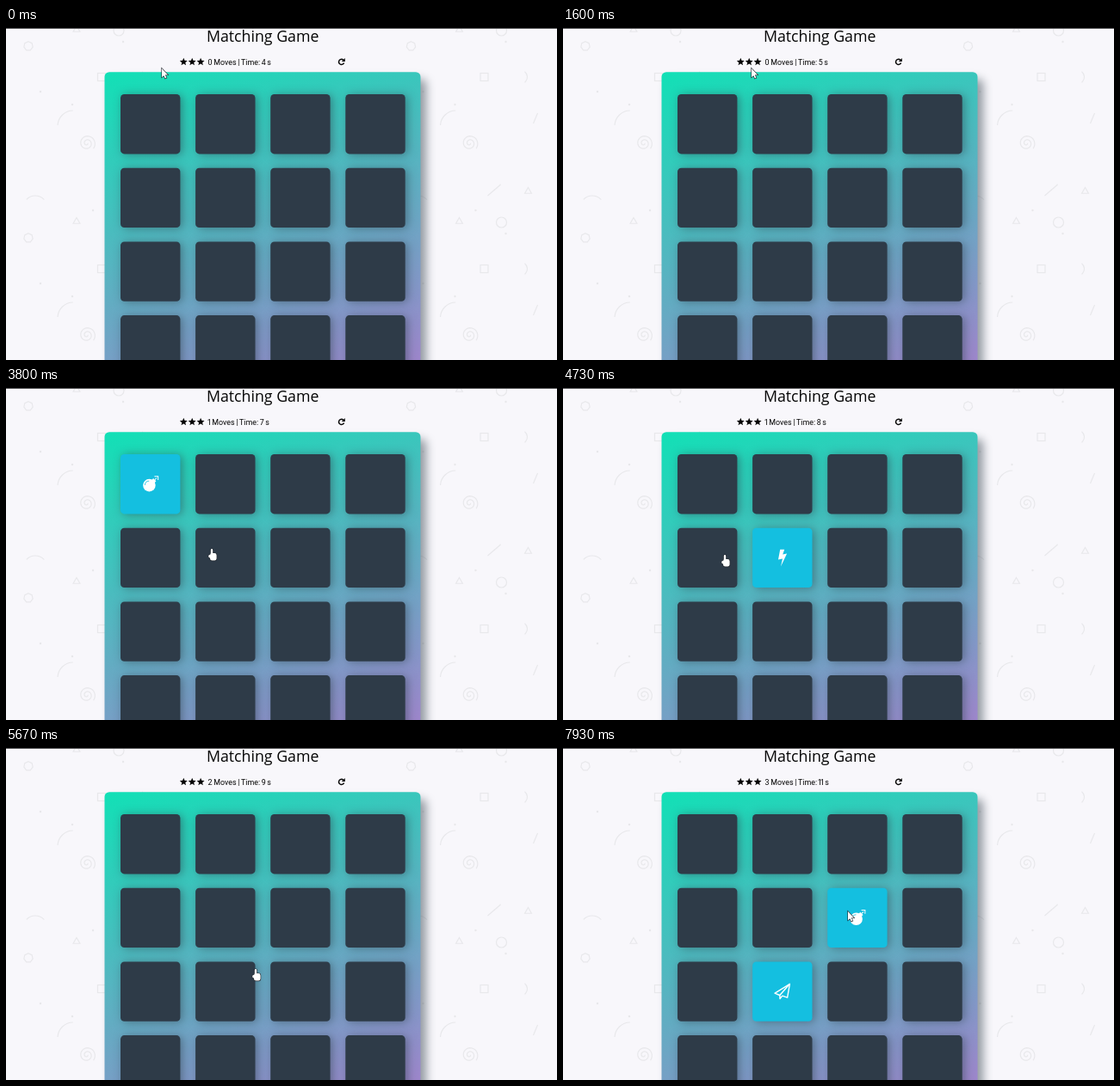
Recreate the animation shown at these times as an HTML page with a canvas. Size 640 by 386 pixels, loop 8 s.

```html
<!DOCTYPE html>
<html lang="en">
<head>
<meta charset="utf-8">
<title>Matching Game</title>
<style>
html, body { margin: 0; width: 100%; height: 100%; overflow: hidden; background: #f8f7fb; }
canvas { display: block; width: 640px; height: 386px; }
</style>
</head>
<body>
<canvas id="stage" width="640" height="386"></canvas>
<script>
const ctx = document.getElementById('stage').getContext('2d');
const LOOP = 8000;
const TILE_W = 444.5, TILE_H = 223;
const CARD = 69.4, STEP_X = 87.1, STEP_Y = 85.7;
const OPEN = '#14bfe0', CLOSED = '#2e3b48', INK = '#050505';

const turns = [
  { col: 0, row: 0, icon: bomb, from: 3200, to: 4730 },
  { col: 1, row: 1, icon: bolt, from: 4130, to: 4870 },
  { col: 1, row: 2, icon: plane, from: 5930, to: LOOP },
  { col: 2, row: 1, icon: bomb, from: 7400, to: LOOP }
];
const moveTimes = [3200, 4800, 7400];

const start = { x: 181, y: 47 };
const glides = [
  { x: 219, y: 47, from: 0, to: 1600 },
  { x: 159, y: 104, from: 1600, to: 2870 },
  { x: 239, y: 187, from: 3200, to: 3800 },
  { x: 188, y: 194, from: 4130, to: 4600 },
  { x: 290, y: 257, from: 4730, to: 5670 },
  { x: 250, y: 270, from: 5670, to: 5930 },
  { x: 331, y: 190, from: 6470, to: 7200 }
];

const cardX = col => 133 + col * STEP_X;
const cardY = row => 77 + row * STEP_Y;

function arc(x, y, r, a = 0, b = Math.PI * 2) {
  ctx.beginPath();
  ctx.arc(x, y, r, a, b);
}

function line(...points) {
  ctx.beginPath();
  points.forEach(([x, y]) => ctx.lineTo(x, y));
}

function shape(...points) {
  line(...points);
  ctx.closePath();
}

// Regular polygon, or a star when a smaller inner radius is given
function ring(x, y, r, corners, inner = r) {
  shape(...Array.from({ length: corners }, (_, i) => {
    const a = i / corners * Math.PI * 2 - Math.PI / 2;
    const d = i % 2 ? inner : r;
    return [x + d * Math.cos(a), y + d * Math.sin(a)];
  }));
}

function placed(x, y, paint) {
  ctx.save();
  ctx.translate(x, y);
  paint();
  ctx.restore();
}

function shadowBox(x, y, w, h, r, fill, dx, dy) {
  ctx.save();
  ctx.shadowColor = 'rgba(46,61,73,.5)';
  ctx.shadowOffsetX = dx;
  ctx.shadowOffsetY = dy;
  ctx.shadowBlur = 11;
  ctx.fillStyle = fill;
  ctx.beginPath();
  ctx.roundRect(x, y, w, h, r);
  ctx.fill();
  ctx.restore();
}

function spiral(x, y) {
  ctx.beginPath();
  for (let a = 0; a < 13.5; a += .25) {
    const r = .8 + a * .68;
    ctx.lineTo(x + r * Math.cos(a), y + r * Math.sin(a));
  }
  ctx.stroke();
}

function zigzag(x, y) {
  ctx.beginPath();
  for (let i = 0; i < 5; i++) {
    ctx.lineTo(x + Math.ceil(i / 2) * 7 + i % 2, y - Math.floor(i / 2) * 6 - (i % 2 ? 0 : -7));
  }
  ctx.stroke();
}

function patternTile() {
  ctx.strokeStyle = ctx.fillStyle = '#e8e8eb';
  ctx.lineWidth = 1.2;
  ring(26, 21, 5.3, 7); ctx.stroke();
  arc(131, 3, 6); ctx.stroke();
  ctx.strokeRect(106.5, 52.5, 9, 9);
  arc(78, 114, 18, 3.2, 4.7); ctx.stroke();
  arc(34, 209, 14, 3.9, 5.55); ctx.stroke();
  arc(153, 57, 8, -.9, .9); ctx.stroke();
  ring(82, 2, 4.5, 3); ctx.stroke();
  ring(162, 190, 4.5, 3); ctx.stroke();
  line([168, 111], [173, 99]); ctx.stroke();
  spiral(94, 134);
  zigzag(115, 188);
  for (const [x, y] of [[40, 74], [136, 16], [77, 89], [101, 212]]) {
    arc(x, y, 1.2);
    ctx.fill();
  }
}

function background() {
  ctx.fillStyle = '#f8f7fb';
  ctx.fillRect(0, 0, 640, 386);
  for (let x = 0; x < 640; x += TILE_W) {
    for (let y = 0; y < 386; y += TILE_H) placed(x, y, patternTile);
  }
  ctx.fillStyle = '#555557';
  ctx.fillRect(0, 0, 640, 1);
}

// Tight word gaps and a slim figure one
function narrowText(text, x, y) {
  for (const ch of text) {
    const one = ch === '1';
    ctx.fillText(ch, one ? x - .8 : x, y);
    x += one ? 3 : ch === ' ' ? 1.6 : ctx.measureText(ch).width;
  }
}

function header(t) {
  const moves = moveTimes.filter(m => t >= m).length;
  const seconds = 4 + Math.max(0, Math.floor((t - 470) / 1000));
  ctx.fillStyle = ctx.strokeStyle = INK;
  ctx.font = '17.76px "Open Sans", sans-serif';
  ctx.textAlign = 'center';
  ctx.fillText('Matching Game', 298.2, 16);
  ctx.textAlign = 'left';
  ctx.font = '8.88px Roboto, sans-serif';
  narrowText(`${moves} Moves | Time: ${seconds} s`, 234.6, 42.5);

  for (let i = 0; i < 3; i++) {
    ring(206.3 + i * 9.9, 39.5, 4.7, 10, 2.1);
    ctx.fill();
  }
  ctx.lineWidth = 1.4;
  arc(389.7, 39.4, 3.1, .35, Math.PI * 1.75);
  ctx.stroke();
  shape([393.8, 35], [393.8, 39], [389.8, 39]);
  ctx.fill();
}

function bomb() {
  ctx.translate(-1.3, 1.4);
  ctx.rotate(Math.PI / 4);
  arc(0, 0, 7.3);
  ctx.fill();
  ctx.fillRect(-2.3, -9, 4.6, 3);
  ctx.lineWidth = 1;
  line([0, -9], [0, -12]);
  ctx.stroke();
  line([-3, -11.5], [0, -14.5], [3, -11.5]);
  ctx.stroke();
  ctx.strokeStyle = OPEN;
  ctx.lineWidth = .8;
  arc(0, 0, 5, 2.4, 3.9);
  ctx.stroke();
}

function bolt() {
  shape([-2.6, -9.7], [2.4, -9.7], [.4, -4], [5.3, -5], [-1.8, 10], [.2, 1], [-4.8, 2]);
  ctx.fill();
}

function plane() {
  ctx.lineWidth = 1.4;
  ctx.lineJoin = 'round';
  shape([-8.8, 2], [8.6, -8.8], [5.8, 7], [0, 5], [-2.8, 8.4], [-3, 4.4]);
  ctx.stroke();
  line([-3, 4.4], [8.6, -8.8]);
  ctx.stroke();
}

function openCard(col, row, t) {
  return turns.find(c => c.col === col && c.row === row && t >= c.from && t < c.to);
}

function deck(t) {
  const shade = ctx.createLinearGradient(216, 15.5, 380, 465.5);
  shade.addColorStop(0, '#12e0b6');
  shade.addColorStop(1, '#aa7ecd');
  shadowBox(114.5, 51.2, 367, 377, 5.5, shade, 6.7, 8.3);

  for (let row = 0; row < 4; row++) {
    for (let col = 0; col < 4; col++) {
      const open = openCard(col, row, t);
      const x = cardX(col), y = cardY(row);
      shadowBox(x, y, CARD, CARD, 4.4, open ? OPEN : CLOSED, 2.8, 1.1);
      if (!open) continue;
      ctx.fillStyle = ctx.strokeStyle = '#fff';
      placed(x + CARD / 2, y + CARD / 2, open.icon);
    }
  }
}

function overClosedCard(x, y, t) {
  const col = Math.floor((x - cardX(0)) / STEP_X);
  const row = Math.floor((y - cardY(0)) / STEP_Y);
  return col >= 0 && row >= 0 && x - cardX(col) < CARD + 2 &&
    y - cardY(row) < CARD && !openCard(col, row, t);
}

function pointerAt(t) {
  let { x, y } = start;
  for (const g of glides) {
    const p = Math.min(1, Math.max(0, (t - g.from) / (g.to - g.from)));
    const e = p * p * (3 - 2 * p);
    x += (g.x - x) * e;
    y += (g.y - y) * e;
  }
  return { x, y };
}

function hand() {
  ctx.beginPath();
  ctx.roundRect(-1.2, 0, 2.4, 9, 1.2);
  ctx.roundRect(-2, 5, 7.6, 8.6, 2.4);
  ctx.roundRect(-3.8, 6.8, 4, 3.6, 1.6);
}

function arrow() {
  shape([0, 0], [0, 10.2], [2.3, 8.2], [3.8, 11.6], [5.4, 10.9], [3.9, 7.6], [7, 7.4]);
}

function pointer(t) {
  const { x, y } = pointerAt(t);
  placed(x, y, () => {
    overClosedCard(x, y, t) ? hand() : arrow();
    ctx.fillStyle = '#fff';
    ctx.strokeStyle = '#20262c';
    ctx.lineWidth = 1.2;
    ctx.stroke();
    ctx.fill();
  });
}

function draw() {
  const t = performance.now() % LOOP;
  background();
  header(t);
  deck(t);
  pointer(t);
  requestAnimationFrame(draw);
}
draw();
</script>
</body>
</html>
```
